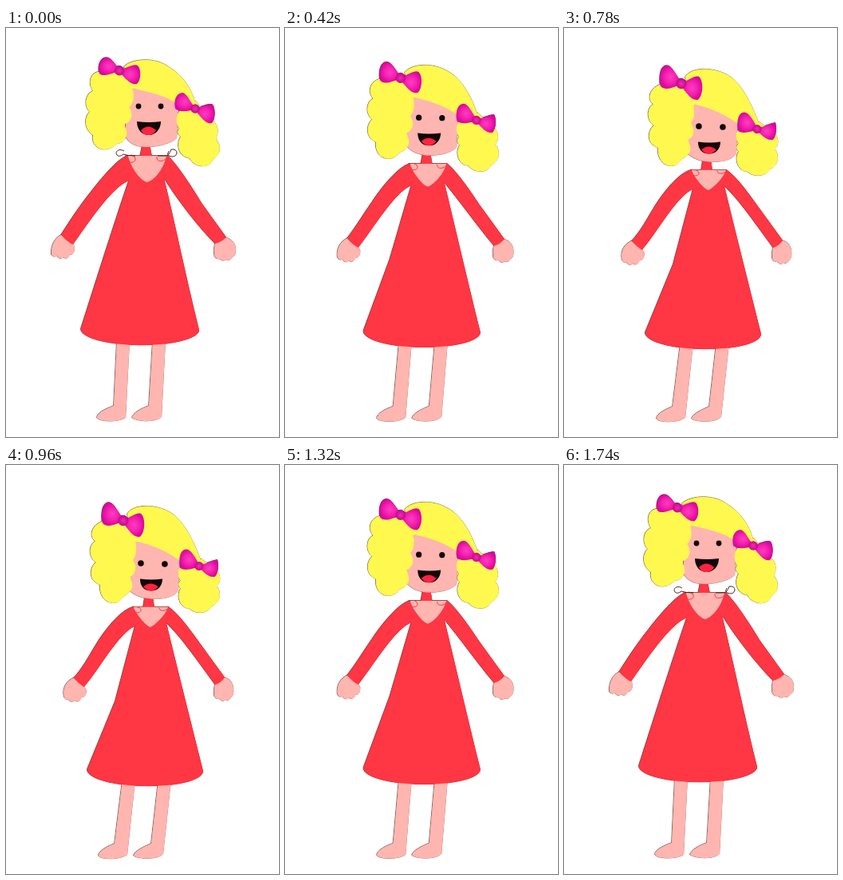
An HTML page that plays this animation: 342x512 px, repeating every 1800 ms.

```html
<!DOCTYPE html>
<html lang="en">
<head>
<meta charset="utf-8">
<title>Dancing girl</title>
<style>
html, body { margin: 0; width: 100%; height: 100%; overflow: hidden; background: #fff; }
svg { display: block; width: 100vw; height: 100vh; }
</style>
</head>
<body>
<svg viewBox="0 0 342 512">
  <defs>
    <radialGradient id="bow"><stop offset="0" stop-color="#ff3fc0"/><stop offset=".55" stop-color="#f51fb0"/><stop offset="1" stop-color="#d6089c"/></radialGradient>
    <radialGradient id="knot"><stop offset="0" stop-color="#f42bb2"/><stop offset="1" stop-color="#c4088e"/></radialGradient>
  </defs>
  <use href="#girl" stroke="#301010" stroke-width=".6" transform="translate(-.4 -.2)"/>
  <g id="girl"></g>
  <path id="straps" fill="none" stroke="#301010" stroke-width=".9" d="M148 154C141 150 136 155 139 159Q142 162 147 158Q152 160 162 160M190 160L200 160Q204 160 207 152Q214 151 214 157Q212 163 204 160Q201 158 204 154"/>
</svg>
<script>
const SKIN = '#ffb5b0', RED = '#ff3643', HAIR = '#fff84f', BOW = 'url(#bow)', KNOT = 'url(#knot)', INK = '#120608';
const dot = (x, y, r) => `M${x - r} ${y}A${r} ${r} 0 1 0 ${x + r} ${y}A${r} ${r} 0 1 0 ${x - r} ${y}Z`;

// Each part: fill, stretched pose, crouched pose, optional stroke
const parts = [
  // legs
  [SKIN, 'M139 390L135 473C124 477 114 482 114 488C117 493 140 494 150 488L155 390Z',
         'M146 395L136 474C128 477 116 483 116 489C118 494 142 495 152 488L162 395Z'],
  [SKIN, 'M184 390L179 473C170 476 159 482 158 488C165 493 188 494 195 487L200 390Z',
         'M191 395L182 474C175 477 161 483 160 489C163 493 190 495 197 487L207 395Z'],
  // hands
  [SKIN, 'M69 259C60 264 56 274 57 284Q61 288 64 285Q67 291 72 287Q77 291 80 284Q86 284 86 275L84 269Z',
         'M86 266C75 271 71 280 73 290Q75 295 78 293Q82 299 87 295Q92 299 95 291Q101 291 101 282L98 277Z'],
  [SKIN, 'M262 269Q260 277 261 284Q262 290 268 289Q272 293 276 290Q282 292 284 286Q288 287 288 277C288 268 281 264 275 262Z',
         'M262 274Q260 281 261 289Q263 294 267 292Q271 298 275 294Q280 296 282 291Q286 289 285 279C284 272 280 267 273 266Z'],
  // dress
  [RED, 'M150 160L154 191C146 214 126 276 124 282L94 376C92 387 125 397 170 397C215 397 243 387 242 378C225 310 212 245 198 188L203 160Z',
        'M159 178L162 201C153 235 137 296 137 296L102 381C101 392 133 402 178 402C222 402 248 393 247 383C230 315 214 252 201 198L204 178Z'],
  // arms
  [RED, 'M152 160C141 163 119 189 106 206C93 222 82 239 69 259Q78 269 84 271C102 246 132 200 154 191L170 170Z',
        'M160 178C147 180 127 202 112 227C104 240 97 254 85 267Q91 274 98 278C118 255 142 210 162 202L175 190Z'],
  [RED, 'M203 160C216 172 238 207 245 219L276 262Q270 268 262 270C240 248 215 215 198 188L190 170Z',
        'M204 178C216 186 232 208 242 222L274 266Q269 273 262 275C242 248 220 215 201 198L193 188Z'],
  // neck and neckline
  [RED, 'M171 146L180 146L183 161L168 161Z', 'M174 165L184 165L186 178L172 178Z'],
  [SKIN, 'M153 160C155 172 168 192 177 193C187 190 198 175 201 160Z',
         'M160 178C161 184 176 203 181 203C188 200 201 186 203 178Z'],
  ['none', 'M151 167C156 169 163 169 162 163Q161 160 157 159', 'M159 184C164 186 170 186 169 181Q168 178 164 178', RED],
  ['none', 'M189 161C188 167 195 169 201 163', 'M192 179C192 183 198 184 203 180', RED],
  // face
  [SKIN, 'M150 60L150 136C155 146 165 149 176 149C192 149 208 144 214 138L217 75Z',
         'M155 85L155 158C165 166 175 168 187 168C200 168 211 165 216 158L219 100Z'],
  [INK, dot(166, 98, 3.4), dot(169, 123.5, 3.8)],
  [INK, dot(194, 98, 3.4), dot(199, 124.5, 3.8)],
  [INK, 'M164 117Q179 119 194 117C194 126 188 134 179 134C169 134 164 126 164 117Z',
        'M168 143Q182 145 196 143C196 152 190 158 182 158C173 158 168 152 168 143Z'],
  ['#ff2340', 'M169 128Q178 119 188 128C186 132 182 134 178 134C174 134 171 132 169 128Z',
              'M172 153Q181 145 191 153C188 156 185 158 182 158C178 158 175 156 172 153Z'],
  // hair
  [HAIR, 'M148 48C160 38 188 36 206 50C222 60 233 76 238 96L215 96C200 84 180 80 155 75Z',
         'M152 62C158 50 184 48 205 59C222 68 236 96 245 122L217 120C205 110 185 100 159 95Z'],
  [HAIR, 'M122 55C106 52 102 68 109 79C100 82 97 97 105 105C97 113 99 128 109 134C107 145 115 153 125 152C132 151 136 148 139 145C148 144 154 135 150 126C149 123 149 121 149 120C158 118 160 106 154 99C161 95 161 82 157 72L150 50Z',
         'M125 70C110 72 102 88 112 96C103 100 104 118 113 122C104 130 104 146 118 150C117 162 123 172 133 173C141 174 146 168 148 164C157 161 161 152 157 145C156 143 156 142 156 140C164 136 164 126 159 119C164 114 164 103 162 94L155 68Z'],
  [HAIR, 'M225 98C215 102 210 116 217 126C214 130 215 133 219 136C213 146 216 161 230 163C235 174 255 178 260 164C270 158 270 146 263 139C267 130 266 122 260 117L238 92Z',
         'M225 122C216 125 213 138 219 145C216 148 215 151 219 155C213 164 218 180 230 180C238 188 254 186 258 177C270 172 270 158 264 152C270 147 269 138 265 133L245 118Z'],
  // bows
  [BOW, 'M142 52C136 44 131 36 125 37C117 38 115 50 117 57C122 62 132 57 142 54Z',
        'M147 68C140 58 135 47 129 47C120 47 119 64 121 73C127 80 138 74 147 71Z'],
  [BOW, 'M143 52C152 50 160 44 165 47C170 52 169 66 164 70C157 72 150 64 143 56Z',
        'M147 69C156 66 163 59 169 61C175 66 175 84 168 90C160 92 154 82 147 73Z'],
  [KNOT, dot(142, 53.5, 6), dot(147, 70, 6.5)],
  [BOW, 'M237 100C231 93 227 82 221 81C212 82 210 92 212 101C218 106 228 104 237 102Z',
        'M242 125C237 116 232 106 226 106C218 106 216 119 218 129C224 134 234 130 242 128Z'],
  [BOW, 'M237 100C246 99 253 94 259 96C263 102 262 115 258 119C251 121 245 113 237 103Z',
        'M242 125C250 125 258 120 265 119C267 125 266 136 262 140C255 142 249 136 242 129Z'],
  [KNOT, dot(237, 101, 5.8), dot(242, 127, 5.5)],
];

const girl = document.getElementById('girl');
const straps = document.getElementById('straps');
const shapes = parts.map(([fill, up, down, stroke]) => {
  const path = document.createElementNS('http://www.w3.org/2000/svg', 'path');
  path.setAttribute('fill', fill);
  if (stroke) path.setAttribute('stroke', stroke);
  girl.append(path);
  return { path, up, ends: down.match(/[\d.]+/g) };
});

function mix(up, ends, p) {
  let i = 0;
  return up.replace(/[\d.]+/g, n => +n + (ends[i++] - n) * p);
}

function smooth(x) {
  x = Math.min(1, Math.max(0, x));
  return x * x * (3 - 2 * x);
}

// Down in two eased moves, then back the same way, in 60 ms steps
let last = -1;
function draw(now) {
  const step = Math.floor(now % 1800 / 60);
  const k = Math.min(step, 29 - step);
  if (k !== last) {
    last = k;
    const p = .49 * smooth(k / 4.5) + .51 * smooth((k - 5) / 9);
    for (const { path, up, ends } of shapes) path.setAttribute('d', mix(up, ends, p));
    straps.setAttribute('visibility', k < 2 ? 'visible' : 'hidden');
  }
}

const start = performance.now();
function tick() {
  draw(performance.now() - start);
  requestAnimationFrame(tick);
}
tick();
</script>
</body>
</html>
```
